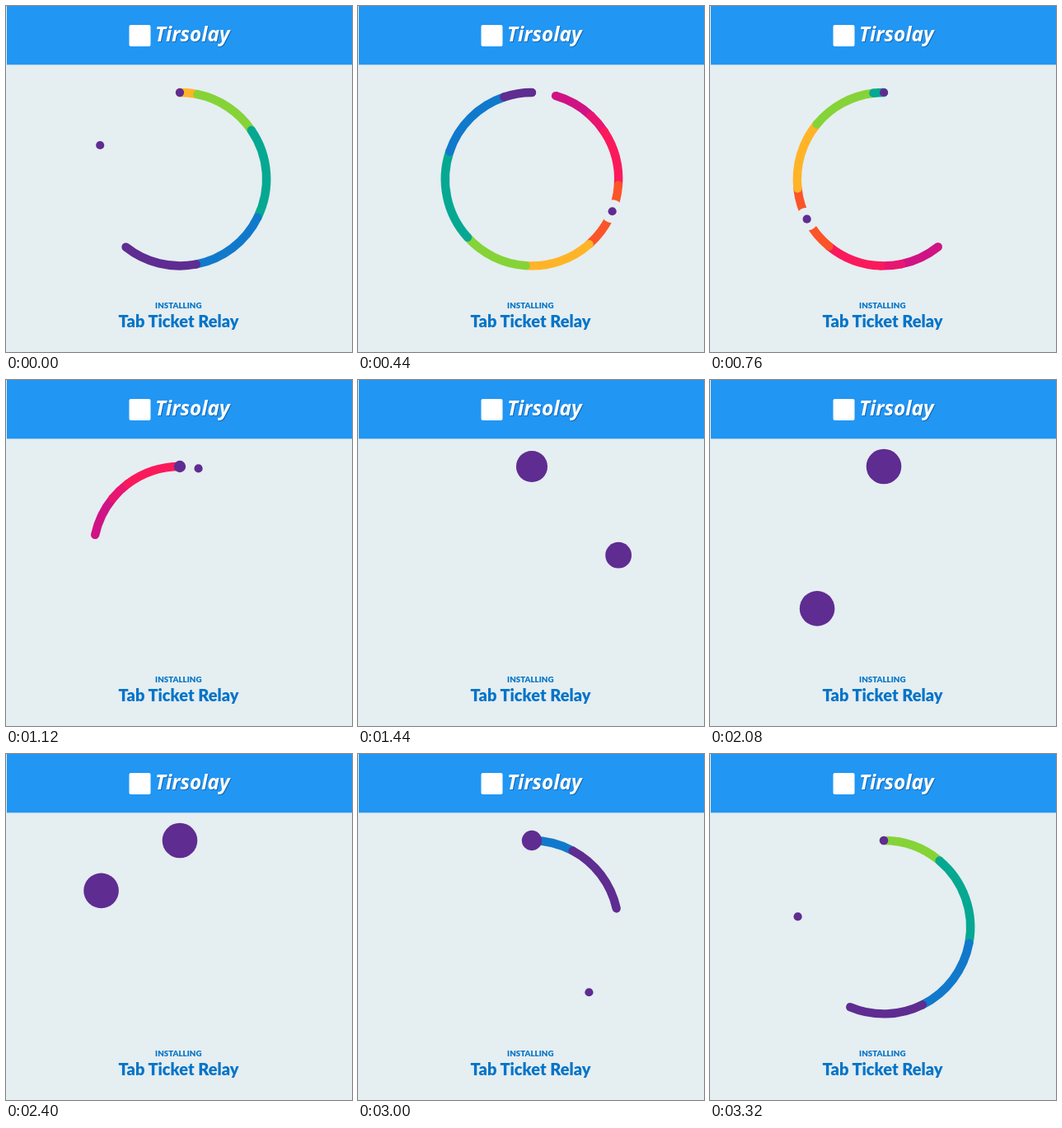
These frames come from a looping animation (420x420 px, 3.36 s). An HTML page with a canvas:

```html
<!DOCTYPE html>
<html lang="en">
<head>
<meta charset="utf-8">
<style>
  html, body { margin: 0; width: 100%; height: 100%; overflow: hidden; background: #e5eef1; }
  svg, canvas { position: absolute; left: 0; top: 0; display: block; }
  .label { font: 900 9.8px Lato, sans-serif; fill: #0474c8; text-anchor: middle; }
  .title { font: 900 20px Lato, sans-serif; fill: #0474c8; text-anchor: middle; }
  .brand { font: italic 700 24.4px "Open Sans", sans-serif; }
</style>
</head>
<body>
<svg width="420" height="420">
  <rect x="1" width="419" height="71.3" fill="#2196f3"/>
  <rect x="149.5" y="23" width="26" height="26" rx="2" fill="#fff"/>
  <text class="brand" x="182" y="44" fill="#1769b5">Tirsolay</text>
  <text class="brand" x="181" y="43" fill="#fff">Tirsolay</text>
  <text class="label" x="209.3" y="367.3">INSTALLING</text>
  <text class="title" x="209.5" y="390">Tab Ticket Relay</text>
</svg>
<canvas id="stage" width="420" height="420"></canvas>
<script>
const ctx = document.getElementById('stage').getContext('2d');
const LOOP = 3360, STEP = 40, LEAD = 560;
const CX = 211, CY = 210.2, R = 105.2;
const SPEED = 0.3915; // trail speed, degrees per ms
const SMALL = 5.1, BIG = 21.3;
const PURPLE = '#5f2c91', BACK = '#e5eef1';

// Trail colours with the time at which each stops being emitted
const trail = [
  [PURPLE, 128], ['#1179cb', 263], ['#06a892', 418], ['#86d338', 530],
  ['#ffb428', 646], ['#fb5428', 760], ['#fa1a5c', 855], ['#e81670', 890],
  ['#d01384', 959]
];

// Orbit of the free dot: time, angle, angular speed
const orbit = [
  [0, 0, 0.9], [200, 138.7, 0.5], [520, 277, 0.4], [1000, 471.8, 0.4],
  [1680, 732.4, 0.3], [2320, 878.8, 0.228], [2960, 1014.9, 0.185], [3360, 1080, 0.135]
];

const clamp = (x, lo = 0, hi = 1) => Math.min(hi, Math.max(lo, x));
const rad = deg => (deg - 90) * Math.PI / 180;

function orbitAngle(s) {
  const i = orbit.findIndex(k => k[0] > s);
  const [t0, a0, v0] = orbit[i - 1], [t1, a1, v1] = orbit[i];
  const d = t1 - t0, u = (s - t0) / d, w = 1 - u;
  return a0 * w * w * (1 + 2 * u) + a1 * u * u * (3 - 2 * u)
    + d * u * w * (v0 * w - v1 * u);
}

function headRadius(s) {
  const k = s < 1000 ? 1 - clamp(s / 590) : clamp((s - 1480) / 560);
  return SMALL + (BIG - SMALL) * k * k;
}

function disc(angle, r, color) {
  const a = rad(angle);
  ctx.fillStyle = color;
  ctx.beginPath();
  ctx.arc(CX + R * Math.cos(a), CY + R * Math.sin(a), r, 0, 2 * Math.PI);
  ctx.fill();
}

function drawTrail(s) {
  ctx.lineWidth = 10.4;
  ctx.lineCap = 'round';
  for (let i = trail.length - 1; i >= 0; i--) {
    const [color, end] = trail[i];
    const start = i ? trail[i - 1][1] : 2;
    const front = clamp((s - start) * SPEED, 0, 360);
    const back = clamp((s - end) * SPEED, 0, 360);
    if (front <= back) continue;
    ctx.strokeStyle = color;
    ctx.beginPath();
    ctx.arc(CX, CY, R, rad(back), rad(front));
    ctx.stroke();
  }
}

function draw(now) {
  const t = Math.floor((now % LOOP) / STEP + 1e-6) * STEP;
  const s = (t + LEAD) % LOOP;
  const angle = orbitAngle(s);
  const dot = SMALL + (BIG - SMALL) * clamp((s - 1680) / 480);
  ctx.clearRect(0, 0, 420, 420);
  drawTrail(s);
  if (s < 1680) disc(angle, 14, BACK);
  disc(angle, dot, PURPLE);
  disc(0, headRadius(s), PURPLE);
}

let begin;
function frame(now) {
  begin ??= now;
  draw(now - begin);
  requestAnimationFrame(frame);
}
requestAnimationFrame(frame);
</script>
</body>
</html>
```
